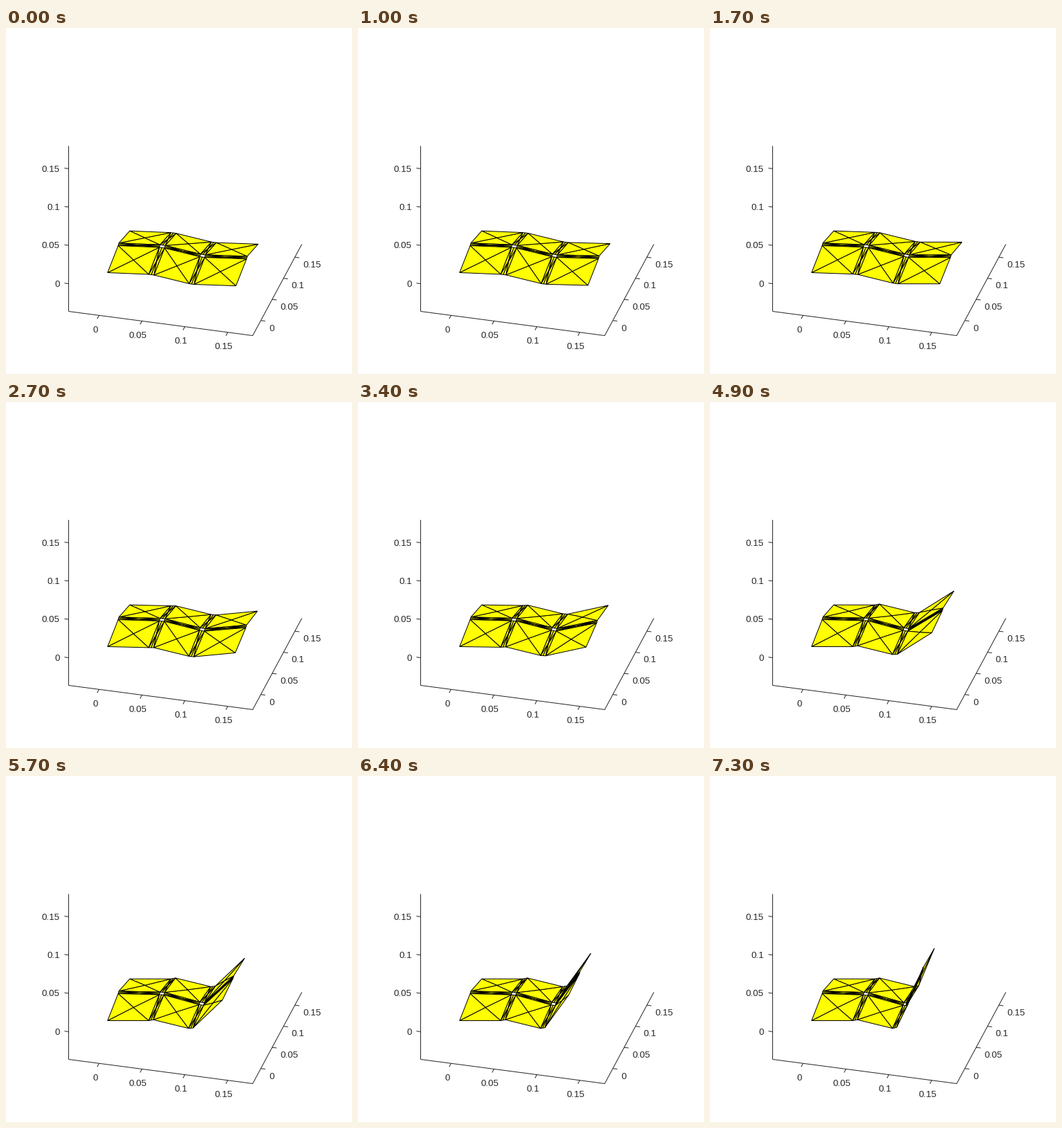
A matplotlib script for the animation above (7.4 s loop, 500 by 500 pixels).

```python
import matplotlib.pyplot as plt
import numpy as np
from matplotlib.animation import FuncAnimation
from matplotlib.collections import PolyCollection

SIZE, DPI = 500, 100
PX = 72 / DPI
INK = (0.15, 0.15, 0.15)
HOLD, FRAMES, INTERVAL = 4, 74, 100

plt.rcParams["font.family"] = "Liberation Sans"
fig = plt.figure(figsize=(SIZE / DPI, SIZE / DPI), dpi=DPI, facecolor="white")
ax = fig.add_axes([0, 0, 1, 1])
ax.set_xlim(-0.5, SIZE - 0.5)
ax.set_ylim(SIZE - 0.5, -0.5)
ax.axis("off")


def line(*pts):
    ax.plot(*zip(*pts), color=INK, lw=PX, solid_capstyle="butt", snap=False)


def axis_ticks(start, step, tick, text_shift, align):
    for k in range(4):
        x, y = np.add(start, np.multiply(step, k))
        line((x, y), (x + tick[0], y + tick[1]))
        ax.text(x + text_shift[0], y + text_shift[1], f"{0.05 * k:g}", color=INK,
                size=13.33 * PX, ha=align, va="center")


def draw_axes():
    line((90, 170), (90, 409))
    line((90, 409), (356, 444), (427, 312))
    axis_ticks((90, 369), (0, -55.4), (-6, -0.8), (-12.7, 1.2), "right")
    axis_ticks((134, 414.8), (62, 8.15), (-2.7, 5), (-5.7, 21.4), "center")
    axis_ticks((367.8, 422.2), (16.4, -30.5), (6.3, 0.8), (11.8, 11.8), "left")


def turn(flat, rise, angle):
    """Projected edge, rotated from lying flat towards upright."""
    return np.cos(angle) * np.array(flat) - np.sin(angle) * np.array([0, rise])


def sheet(step):
    """Six column edges, each with four points from front to back."""
    settle = np.sin(np.pi / 2 * min(step / 50, 1)) ** 2
    fold = 0.161 * np.logaddexp(0, (step - 21) / 6.5)
    edges = [
        (146.3, 353),
        (59.5, 2.5 - 2.5 * settle),
        (7.5 - settle, 1 - 2.3 * settle),
        (51, 12.5),
        turn((7, 1), 4, fold / 2),
        turn((60.5, 2.5), 59, fold),
    ]
    front = np.cumsum(edges, axis=0)

    # The ridge between the rows flattens more towards the folded side.
    flatten = (settle + fold / 1.2) / 2
    ridge = 11 - 1.9 * flatten * np.arange(6)
    rows = np.array([(0, 0), (15.3, -28), (16.3, -31.7), (32, -60.3)])
    lift = np.outer(ridge, (0, 1, 1, 0))
    return front[:, None] + rows - np.stack([0 * lift, lift], axis=-1)


def panel(a, b, c, d):
    m = (a + b + c + d) / 4
    return [(p, q, m) for p, q in ((a, b), (b, c), (c, d), (d, a))]


def crease(a, b, c, d):
    """Strip between sides a-b and c-d, folded along its middle line."""
    e, f = (a + c) / 2, (b + d) / 2
    m = (e + f) / 2
    return [(a, b, m), (c, d, m), (a, e, m), (c, e, m), (b, f, m), (d, f, m)]


def triangles(step):
    g = sheet(step)
    tris = []

    def row(n):
        for c in (0, 2, 4):
            tris.extend(panel(g[c, n], g[c + 1, n], g[c + 1, n + 1], g[c, n + 1]))
        for c in (1, 3):
            tris.extend(crease(g[c, n], g[c, n + 1], g[c + 1, n], g[c + 1, n + 1]))

    row(2)
    for c in (0, 2, 4):
        tris.extend(crease(g[c, 1], g[c + 1, 1], g[c, 2], g[c + 1, 2]))
    row(0)
    return np.array(tris)


draw_axes()
mesh = PolyCollection(triangles(0), facecolor="yellow", edgecolor="black",
                      linewidth=PX, joinstyle="bevel", zorder=3)
ax.add_collection(mesh, autolim=False)


def update(i):
    mesh.set_verts(triangles(max(0, i - HOLD)))
    return (mesh,)


anim = FuncAnimation(fig, update, frames=FRAMES, interval=INTERVAL,
                     repeat=True, repeat_delay=0)
plt.show()
```
